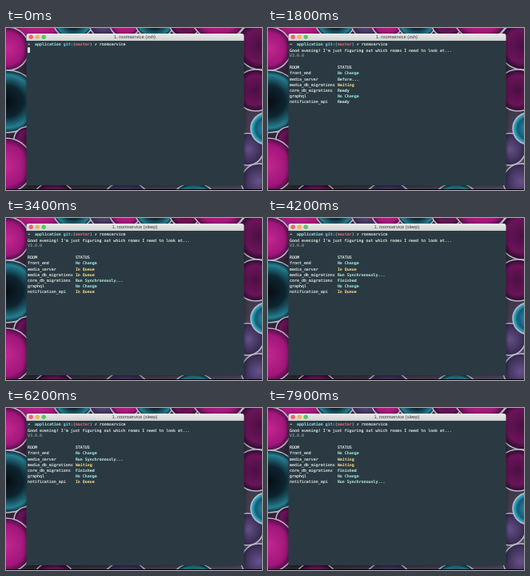
Recreate the animation shown at these times as an HTML page. Size 320x203 px, loop 8000 ms.

```html
<!DOCTYPE html>
<html lang="en">
<head>
<meta charset="utf-8">
<title>Terminal session</title>
<style>
  html, body { margin: 0; width: 100%; height: 100%; overflow: hidden; background: #000; }
  svg { display: block; width: 100%; height: 100%; }
  text { white-space: pre; text-rendering: geometricPrecision; }
  .term { font: 4.97px "DejaVu Sans Mono", "DejaVu Sans", monospace; fill: #f4f8f7; }
  .term text { stroke: currentColor; stroke-width: .12px; color: #e3e9e8; }
  .term .bold { font-weight: bold; stroke: none; }
  .term .grey { fill: #b3bfc1; stroke: none; }
  .title { font: 5.75px "Liberation Sans", Arial, sans-serif; fill: #3c3c3c; text-anchor: middle; }
  .cyan { fill: #9deeee; }
  .blue { fill: #7bd0ea; }
  .red { fill: #f36c76; }
  .mint { fill: #bdf5e4; }
  .yellow { fill: #fbe091; }
</style>
</head>
<body>
<svg viewBox="0 0 320 203" preserveAspectRatio="none">
  <defs>
    <linearGradient id="backdrop" x2="1" y2="1">
      <stop offset="0" stop-color="#3a2440"/>
      <stop offset=".5" stop-color="#2a2530"/>
      <stop offset="1" stop-color="#55506a"/>
    </linearGradient>
    <radialGradient id="pink">
      <stop offset="0" stop-color="#c2278f"/>
      <stop offset=".75" stop-color="#a0167a"/>
      <stop offset="1" stop-color="#4c0d42"/>
    </radialGradient>
    <radialGradient id="plum">
      <stop offset="0" stop-color="#4b0f42"/>
      <stop offset=".7" stop-color="#6a1459"/>
      <stop offset="1" stop-color="#2a0c2a"/>
    </radialGradient>
    <radialGradient id="teal">
      <stop offset="0" stop-color="#080d14"/>
      <stop offset=".5" stop-color="#0d2530"/>
      <stop offset=".85" stop-color="#257f92"/>
      <stop offset="1" stop-color="#0c2028"/>
    </radialGradient>
    <radialGradient id="aqua">
      <stop offset="0" stop-color="#2b9fbd"/>
      <stop offset=".7" stop-color="#145a75"/>
      <stop offset="1" stop-color="#3cc6dc"/>
    </radialGradient>
    <radialGradient id="violet">
      <stop offset="0" stop-color="#66518a"/>
      <stop offset="1" stop-color="#33284c"/>
    </radialGradient>
    <linearGradient id="bar" x2="0" y2="1">
      <stop offset="0" stop-color="#ececec"/>
      <stop offset="1" stop-color="#d0d0d0"/>
    </linearGradient>
    <filter id="shadow" x="-10%" y="-10%" width="120%" height="120%">
      <feGaussianBlur stdDeviation="3"/>
    </filter>
  </defs>

  <rect width="320" height="202" fill="url(#backdrop)"/>
  <g id="bubbles" stroke="#b9b6c8" stroke-width="1.6"></g>
  <rect x="26" y="10" width="271" height="188" rx="3" opacity=".5" filter="url(#shadow)"/>
  <path d="M25.5 197V10q0-3 3-3h266q3 0 3 3V197z" fill="#2b3a42"/>
  <path d="M25.5 16V10q0-3 3-3h266q3 0 3 3v6z" fill="url(#bar)"/>
  <circle cx="31.2" cy="11.2" r="2.7" fill="#ee6470"/>
  <circle cx="39.2" cy="11.2" r="2.7" fill="#f3b45a"/>
  <circle cx="47.2" cy="11.2" r="2.7" fill="#5cc65f"/>
  <text id="title" class="title" x="161" y="12.9"></text>

  <g class="term">
    <text class="bold" x="27" y="22.3">➜</text>
    <text class="bold" x="36" y="22.3"><tspan class="cyan">application</tspan> <tspan class="blue">git:(</tspan><tspan class="red">master</tspan><tspan class="blue">)</tspan></text>
    <text class="bold" x="110.8" y="22.3">✗</text>
    <text x="116.8" y="22.3">roomservice</text>
    <rect id="cursor" x="27" y="24.3" width="3" height="6.8" fill="#dfe5e5"/>
    <text id="greeting" x="27" y="29.5">Good evening! I'm just figuring out which rooms I need to look at...</text>
    <text id="version" class="grey" x="27" y="36.4">V3.0.0</text>
    <g id="table"></g>
  </g>
  <rect y="202" width="320" height="1"/>
</svg>
<script>
const LOOP = 8000;
const GREETING_AT = 400;
const TABLE_AT = 600;
const SLEEP_AT = 2800;

const byId = id => document.getElementById(id);

function add(parent, tag, attrs, content = '') {
  const node = document.createElementNS('http://www.w3.org/2000/svg', tag);
  for (const key in attrs) node.setAttribute(key, attrs[key]);
  node.textContent = content;
  parent.append(node);
  return node;
}

// Tone, centre and radius of each backdrop bubble.
const bubbles = [
  ['pink', 40, -10, 32], ['teal', 84, -12, 26], ['violet', 122, -6, 18],
  ['pink', 149, -8, 20], ['teal', 186, -12, 26], ['plum', 224, -8, 20],
  ['pink', 266, -20, 36], ['pink', 2, 26, 27], ['teal', 2, 92, 39],
  ['plum', 26, 140, 16], ['pink', 0, 172, 34],
  ['plum', 318, 22, 30], ['plum', 312, 78, 26], ['violet', 302, 152, 20],
  ['aqua', 326, 126, 20], ['violet', 316, 192, 22],
  ['plum', 60, 220, 28], ['violet', 150, 224, 32], ['teal', 235, 226, 32]
];
for (const [tone, cx, cy, r] of bubbles) {
  add(byId('bubbles'), 'circle', { cx, cy, r, fill: `url(#${tone})` });
}

const tones = {
  'No Change': 'cyan', 'Before...': 'mint', 'Ready': 'mint',
  'Waiting': 'yellow', 'In Queue': 'yellow',
  'Run Synchronously...': 'mint', 'Finished': 'mint'
};

// Each room: its name, then [start time, status] steps.
const rooms = [
  ['front_end', [0, 'No Change']],
  ['media_server', [0, 'Before...'], [2800, 'In Queue'], [5700, 'Run Synchronously...'], [7100, 'Waiting']],
  ['media_db_migrations', [0, 'Before...'], [1800, 'Waiting'], [2800, 'In Queue'], [4050, 'Run Synchronously...'], [5700, 'Waiting']],
  ['core_db_migrations', [0, 'Ready'], [2800, 'Run Synchronously...'], [4050, 'Finished']],
  ['graphql', [0, 'No Change']],
  ['notification_api', [0, 'Ready'], [2800, 'In Queue'], [7100, 'Run Synchronously...']]
];

const table = byId('table');
const cell = (x, row, content) => add(table, 'text', { x, y: 51.2 + row * 7.17 }, content);
cell(27, 0, 'ROOM');
cell(86.9, 0, 'STATUS');
const cells = rooms.map(([name], i) => {
  cell(27, i + 1, name);
  return cell(86.9, i + 1, '');
});

const show = (id, on) => byId(id).setAttribute('visibility', on ? 'visible' : 'hidden');

function draw(now) {
  const t = now % LOOP;
  show('cursor', t < GREETING_AT);
  show('greeting', t >= GREETING_AT);
  show('version', t >= GREETING_AT);
  show('table', t >= TABLE_AT);
  byId('title').textContent = `1. roomservice (${t < SLEEP_AT ? 'zsh' : 'sleep'})`;
  rooms.forEach(([, ...steps], i) => {
    const status = steps.filter(([start]) => start <= t).pop()[1];
    cells[i].textContent = status;
    cells[i].setAttribute('class', 'bold ' + tones[status]);
  });
}

const begin = performance.now();
function tick() {
  draw(performance.now() - begin);
  requestAnimationFrame(tick);
}
tick();
</script>
</body>
</html>
```
